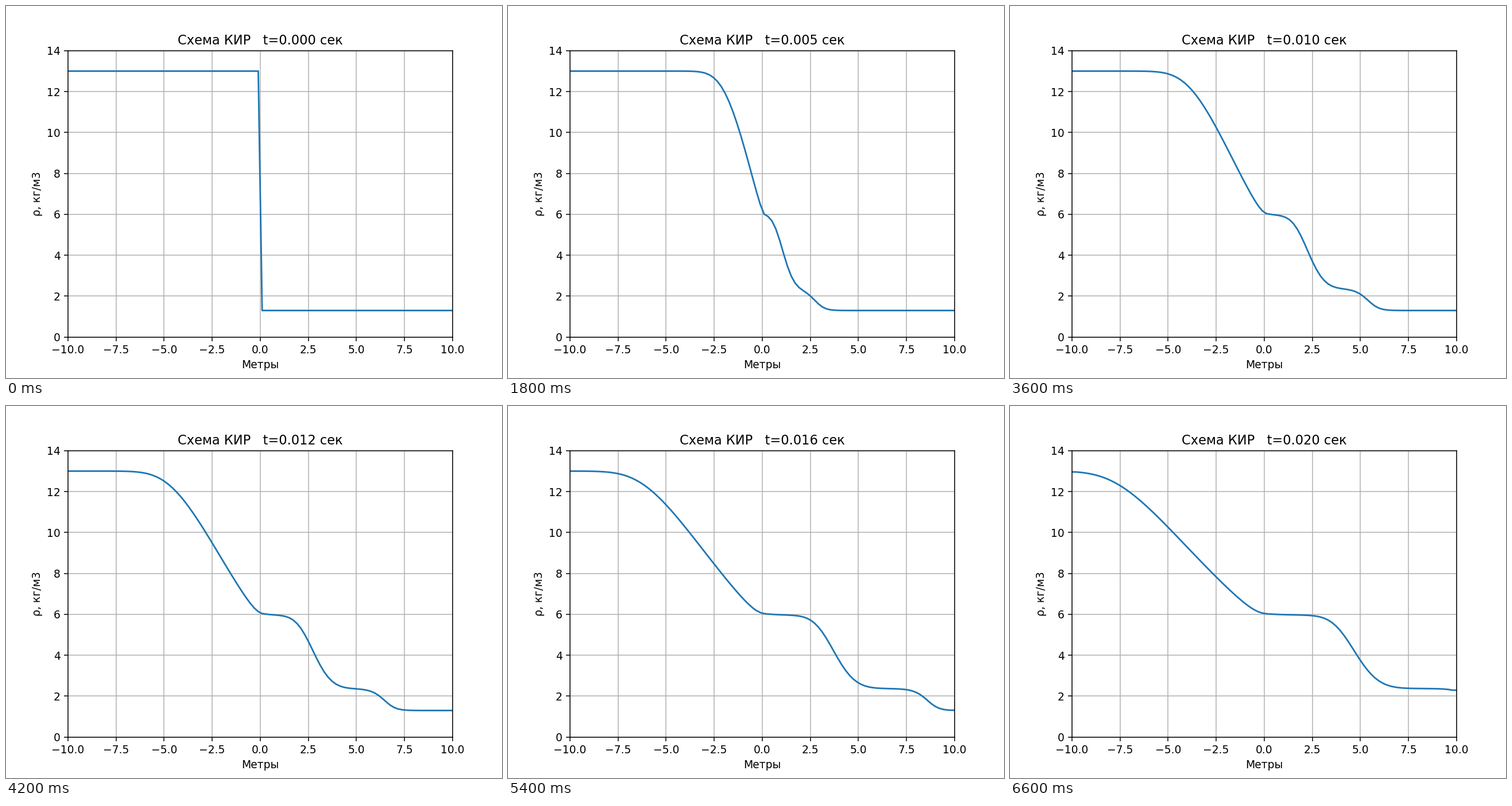
Animation, 864 px wide and 648 px high, one loop 6.9 s. Source, as a matplotlib script:

```python
import numpy as np
import matplotlib.pyplot as plt
from matplotlib.animation import FuncAnimation

GAMMA = 5 / 3
G1 = GAMMA - 1
ATM = 101325.0
HALF = 10.0             # half length of the tube, m
NX = 100
TAU = 2e-6              # time step, s
STEPS_PER_MS = 500
T_END_MS = 20
REPEATED_MS = (1, 8)    # moments stored again one step later

x = np.linspace(-HALF, HALF, NX)
h = x[1] - x[0]


def initial_state():
    """Shock tube at rest: density, momentum, internal energy."""
    rho = np.where(x < 0, 13.0, 1.3)
    p = np.where(x < 0, 10 * ATM, ATM)
    return np.array([rho, np.zeros(NX), p / G1])


def to_waves(d, u, c):
    a, b, e = d
    s = c * (b - u * a)
    return np.array([s + G1 * e, G1 * e - c * c * a, G1 * e - s])


def from_waves(q, u, c):
    mean = (q[0] + q[2]) / 2
    a = (mean - q[1]) / c**2
    b = u * a + (q[0] - q[2]) / (2 * c)
    return np.array([a, b, mean / G1])


def step(w):
    """One upwind step along the characteristics, free boundaries."""
    rho, m, en = w[:, 1:-1]
    u = m / rho
    c = np.sqrt(GAMMA * G1 * en / rho)
    speed = np.array([u + c, u, u - c])
    d = w[:, 1:] - w[:, :-1]
    flow = (np.maximum(speed, 0) * to_waves(d[:, :-1], u, c)
            + np.minimum(speed, 0) * to_waves(d[:, 1:], u, c))
    new = w.copy()
    new[:, 1:-1] -= TAU / h * from_waves(flow, u, c)
    new[:, 0] = new[:, 1]
    new[:, -1] = new[:, -2]
    return new


def solve():
    w = initial_state()
    shots = [(0.0, w[0])]
    for n in range(1, T_END_MS * STEPS_PER_MS + 1):
        w = step(w)
        ms, extra = divmod(n, STEPS_PER_MS)
        if extra == 0 or (extra == 1 and ms in REPEATED_MS):
            shots.append((n * TAU, w[0]))
    return shots


shots = solve()

fig, ax = plt.subplots(figsize=(6.4, 4.8), dpi=135)
line, = ax.plot(x, shots[0][1])
ax.set_xlim(-HALF, HALF)
ax.set_ylim(0, 14)
ax.set_xlabel("Метры")
ax.set_ylabel("ρ, кг/м3")
ax.grid()
title = ax.set_title("")


def draw(i):
    t, rho = shots[i]
    line.set_ydata(rho)
    title.set_text(f"Схема КИР   t={t:.3f} сек")
    return line, title


anim = FuncAnimation(fig, draw, frames=len(shots), interval=300,
                     repeat=True, repeat_delay=0)
plt.show()
```
